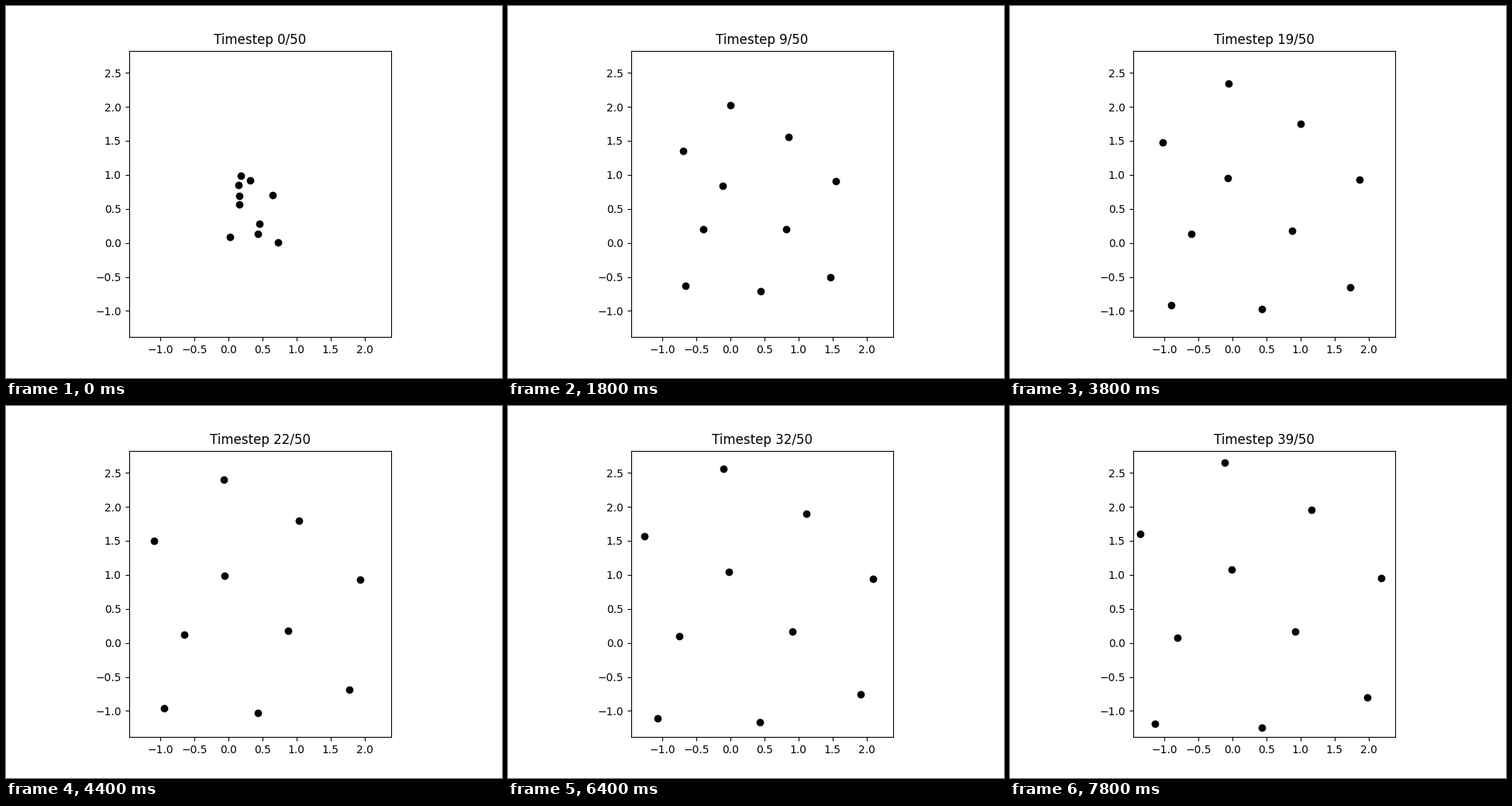
A matplotlib script for the animation above (8 s loop, 640 by 480 pixels).

```python
import numpy as np
import matplotlib.pyplot as plt
from matplotlib.animation import FuncAnimation
from matplotlib.transforms import IdentityTransform

W, H, DPI = 640, 480, 100
STEPS, TOTAL, INTERVAL = 40, 50, 200
BURST = 5  # timestep at which the first fast push apart is over

# Stage positions of the particles: start, after the burst, last step
START = np.array([(303, 219), (315, 225), (300, 231), (301, 245), (301, 256),
                  (344, 244), (327, 281), (325, 294), (289, 298), (351, 305)])
SPREAD = np.array([(291, 148), (352, 182), (248, 195), (273, 240), (265, 284),
                   (403, 228), (356, 287), (326, 350), (244, 343), (400, 341)])
END = np.array([(277, 73), (389, 134), (168, 165), (286, 211), (216, 299),
                (479, 222), (368, 291), (325, 415), (187, 410), (461, 376)])


def glide(a, b, t0, t1, t):
    """Move from a to b with a speed that falls off like 1 / (1 + t)."""
    s = np.log((1 + t) / (1 + t0)) / np.log((1 + t1) / (1 + t0))
    return a + (b - a) * s


def positions(step):
    if step < BURST:
        return glide(START, SPREAD, 0, BURST, step)
    return glide(SPREAD, END, BURST, STEPS - 1, step)


fig, ax = plt.subplots(figsize=(W / DPI, H / DPI), dpi=DPI)
ax.set_aspect("equal")
ax.set_xlim(-1.4633, 2.3975)
ax.set_ylim(-1.3845, 2.8255)
ax.set_xticks(np.arange(-1, 2.1, 0.5))
ax.set_yticks(np.arange(-1, 2.6, 0.5))
title = ax.set_title("")
dots, = ax.plot([], [], "ko", transform=IdentityTransform())


def draw(step):
    x, y = positions(step).T
    dots.set_data(x, H - y)
    title.set_text(f"Timestep {step}/{TOTAL}")
    return dots, title


anim = FuncAnimation(fig, draw, frames=STEPS, interval=INTERVAL,
                     init_func=lambda: draw(0), repeat=True, repeat_delay=0)
plt.show()
```
